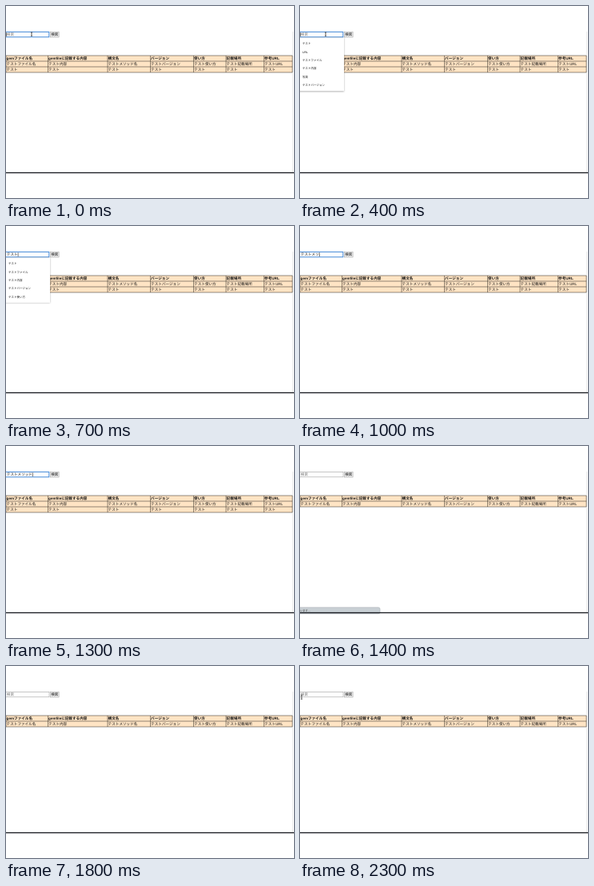
An HTML page with a canvas for the animation above (2.4 s loop, 360x240 px).

```html
<!DOCTYPE html>
<html lang="ja">
<meta charset="utf-8">
<style>
html, body { margin: 0; width: 100%; height: 100%; overflow: hidden; background: #fff; }
canvas { display: block; width: 360px; height: 240px; }
</style>
<canvas width="360" height="240"></canvas>
<script>
const canvas = document.querySelector('canvas');
const ctx = canvas.getContext('2d');
const LOOP = 2400, STEP = 100;
const FONT = '"Liberation Sans", "Noto Sans CJK JP", "Noto Sans CJK", sans-serif';
const COLUMNS = [0, 52.5, 127, 180.5, 234.5, 275, 322.5, 358];
const ROWS = [
  ['gemファイル名', 'gemfileに記載する内容', '構文名', 'バージョン', '使い方', '記載場所', '参考URL'],
  ['テストファイル名', 'テスト内容', 'テストメソッド名', 'テストバージョン', 'テスト使い方', 'テスト記載場所', 'テストURL'],
  Array(7).fill('テスト')
];
const HISTORY = ['テスト', 'URL', 'テストファイル', 'テスト内容', '写真', 'テストバージョン', 'テスト使い方'];
// Start time of each typed state
const TYPED = [[0, ''], [500, 't'], [600, 'テスト'], [900, 'テストm'], [1000, 'テストメソ'], [1100, 'テストメソッド'], [1400, '']];

function rect(x, y, w, h, color) {
  ctx.fillStyle = color;
  ctx.fillRect(x, y, w, h);
}

function text(str, x, y, size = 4.6, color = '#111', weight = 400) {
  ctx.font = `${weight} ${size}px ${FONT}`;
  ctx.fillStyle = color;
  ctx.fillText(str, x, y);
}

function frame(x, y, w, h, color, width) {
  ctx.strokeStyle = color;
  ctx.lineWidth = width;
  ctx.strokeRect(x, y, w, h);
}

function drawTable(count) {
  const top = 62, height = 7;
  rect(0, top, 358, count * height, '#ffe4c4');
  for (let i = 0; i <= count; i++) rect(0, top + i * height - .3, 358, .6, '#4a4238');
  for (const x of COLUMNS) rect(x - .3, top, .6, count * height, '#4a4238');
  ROWS.slice(0, count).forEach((row, i) => row.forEach((cell, j) =>
    text(cell, COLUMNS[j] + .6, top + i * height + 5.2, 4.6, '#111', i ? 400 : 700)));
}

function drawSearch(value, focused) {
  rect(0, 32, 54, 7, '#fff');
  if (focused) frame(-1, 32.4, 54.8, 6.4, '#4389d8', 1);
  else frame(-1, 32.4, 55, 6.4, '#a0a0a0', .6);
  text(value || '検索', .8, 37.2, 4.6, value ? '#111' : '#777');
  if (focused) rect(value ? 1 + ctx.measureText(value).width : .3, 33.3, .6, 4.8, '#222');
  rect(55.3, 32.4, 10.8, 6.6, '#eee');
  frame(55.3, 32.4, 10.8, 6.6, '#999', .5);
  text('検索', 56.2, 37.3, 4.6, '#111', 500);
}

function drawSuggestions(items) {
  const height = items.length * 10.3 + 4.6;
  ctx.save();
  ctx.shadowColor = 'rgba(0,0,0,.35)';
  ctx.shadowBlur = 2;
  ctx.shadowOffsetY = .5;
  rect(-2, 39.8, 57, height, '#fff');
  ctx.restore();
  items.forEach((item, i) => text(item, 3, 48.4 + i * 10.3, 3.5, '#111', 500));
}

function drawStatus() {
  ctx.fillStyle = '#c9d0d5';
  ctx.strokeStyle = '#a9b0b6';
  ctx.lineWidth = .6;
  ctx.beginPath();
  ctx.roundRect(-2, 201.8, 102, 8, 2);
  ctx.fill();
  ctx.stroke();
  text('います...', 0, 206.6, 3.3, '#333');
}

function drawBeam(x, y) {
  rect(x - .4, y - 2.4, .8, 4.8, '#222');
  rect(x - 1.1, y - 2.6, 2.2, .5, '#222');
  rect(x - 1.1, y + 2.1, 2.2, .5, '#222');
}

function drawArrow(x, y) {
  ctx.beginPath();
  [[0, 0], [0, 5], [1.2, 4], [2, 5.6], [2.8, 5.2], [2.1, 3.7], [3.6, 3.6]]
    .forEach(([dx, dy]) => ctx.lineTo(x + dx, y + dy));
  ctx.closePath();
  ctx.fillStyle = '#111';
  ctx.fill();
  frame(0, 0, 0, 0, '#fff', .4);
  ctx.stroke();
}

function draw(t) {
  rect(0, 0, 360, 240, '#fff');
  const value = TYPED.findLast(([start]) => t >= start)[1];
  rect(358.2, 32, .6, 176, '#dedede');
  drawTable(t < 1400 ? 3 : 2);
  drawSearch(value, t < 1400);

  if (t >= 200 && t < 900) {
    const matches = value === 'テスト' ? HISTORY.filter(s => s.startsWith(value)) : HISTORY.slice(0, 6);
    drawSuggestions(matches);
  }
  if (t >= 1400 && t < 1600) drawStatus();
  rect(0, 207.8, 360, 1.3, '#17191f');

  if (t < 500) drawBeam(32, 35.3);
  if (t >= 1900) {
    const p = Math.min(1, (t - 1900) / 400);
    const k = 1 - (1 - p) ** 2;
    const x = 340 - 338 * k, y = 71 - 32 * k;
    if (p < 1) drawArrow(x, y);
    else drawBeam(x, y);
  }
}

function tick() {
  const t = performance.now() % LOOP;
  draw(Math.floor(t / STEP) * STEP);
  requestAnimationFrame(tick);
}
ctx.textRendering = 'geometricPrecision';
tick();
</script>
</html>
```
